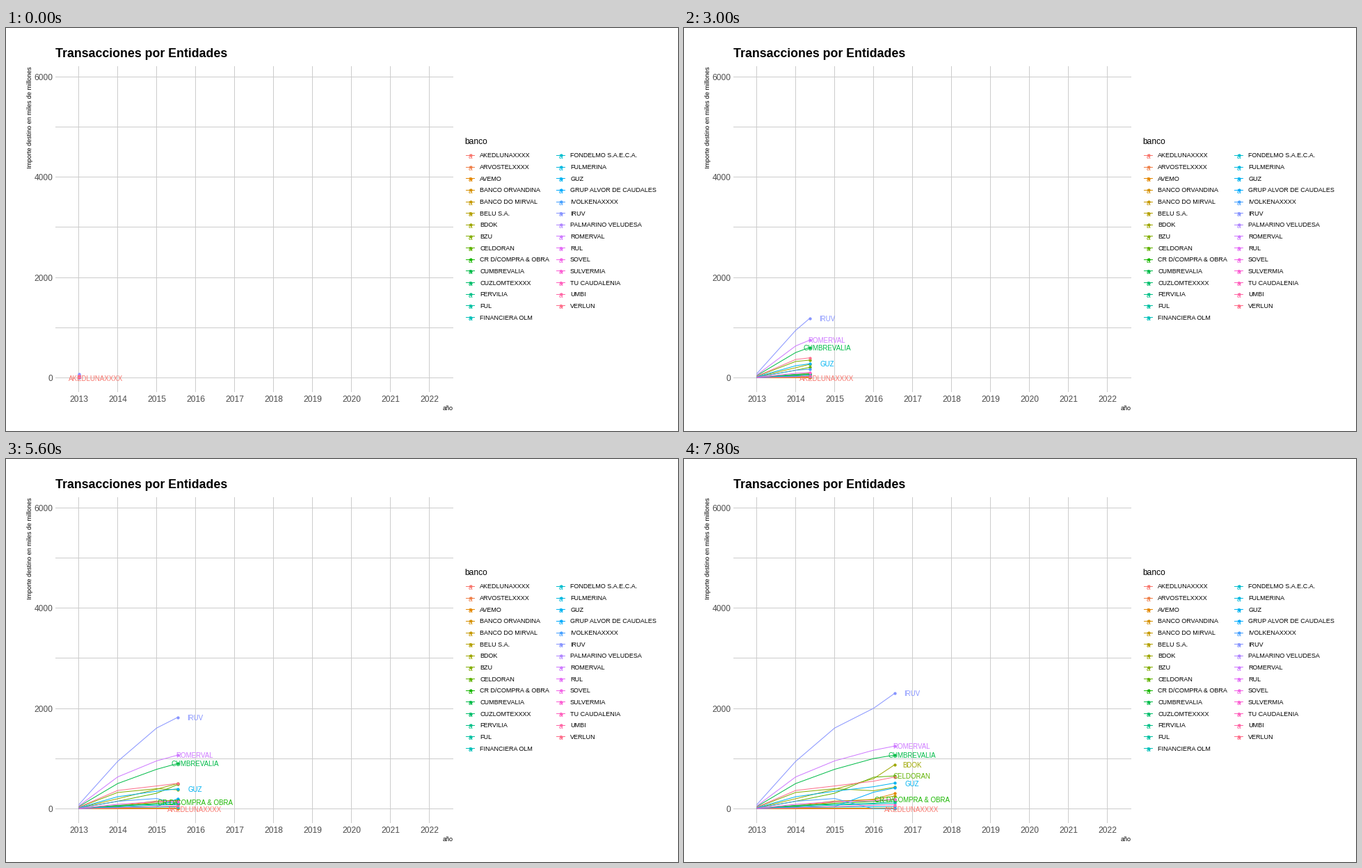
Recreate the animation shown at these times as a matplotlib script. Size 966x580 px, loop 8 s.

```python
import math

import numpy as np
import matplotlib.pyplot as plt
from matplotlib.animation import FuncAnimation

W, H, DPI = 966, 580, 64
FRAMES, INTERVAL, STEPS_PER_YEAR = 40, 200, 11
LABEL_GAP = 9

BANKS = [
    "AKEDLUNAXXXX", "ARVOSTELXXXX", "AVEMO", "BANCO ORVANDINA",
    "BANCO DO MIRVAL", "BELU S.A.", "BDOK", "BZU", "CELDORAN",
    "CR D/COMPRA & OBRA", "CUMBREVALIA", "CUZLOMTEXXXX", "FERVILIA", "FUL",
    "FINANCIERA OLM", "FONDELMO S.A.E.C.A.", "FULMERINA", "GUZ",
    "GRUP ALVOR DE CAUDALES", "IVOLKENAXXXX", "IRUV", "PALMARINO VELUDESA",
    "ROMERVAL", "RUL", "SOVEL", "SULVERMIA", "TU CAUDALENIA", "UMBI",
    "VERLUN",
]

# Yearly amounts for 2014 to 2017; 2013 is a small share of 2014.
AMOUNTS = {
    "AKEDLUNAXXXX": (0, 0, 0, 0),
    "ARVOSTELXXXX": (2, 3, 4, 5),
    "AVEMO": (50, 135, 190, 400),
    "BANCO ORVANDINA": (8, 10, 8, 12),
    "BANCO DO MIRVAL": (12, 15, 10, 14),
    "BELU S.A.": (60, 155, 180, 320),
    "BDOK": (200, 390, 600, 1114),
    "BZU": (325, 400, 360, 490),
    "CELDORAN": (150, 310, 630, 676),
    "CR D/COMPRA & OBRA": (50, 110, 145, 215),
    "CUMBREVALIA": (503, 787, 1002, 1130),
    "FERVILIA": (70, 85, 110, 180),
    "FINANCIERA OLM": (40, 75, 95, 130),
    "FULMERINA": (25, 35, 40, 50),
    "GUZ": (240, 350, 440, 575),
    "GRUP ALVOR DE CAUDALES": (30, 45, 330, 486),
    "IVOLKENAXXXX": (150, 205, 0, 0),
    "IRUV": (945, 1610, 2004, 2554),
    "ROMERVAL": (635, 955, 1168, 1320),
    "SULVERMIA": (90, 140, 160, 215),
    "TU CAUDALENIA": (20, 45, 70, 90),
    "VERLUN": (365, 455, 550, 705),
}

# Earlier names keep their label when two would overlap.
LABEL_ORDER = [
    "AKEDLUNAXXXX", "CUMBREVALIA", "CR D/COMPRA & OBRA", "GUZ", "IRUV",
    "ROMERVAL", "BDOK", "CELDORAN", "IVOLKENAXXXX",
]


def hcl(hue, chroma=100, light=65):
    """Polar CIE-LUV colour as clipped sRGB."""
    a = math.radians(hue)
    u = chroma * math.cos(a) / (13 * light) + 0.1978
    v = chroma * math.sin(a) / (13 * light) + 0.4683
    y = ((light + 16) / 116) ** 3
    xyz = np.array([9 * u / (4 * v), 1, (12 - 3 * u - 20 * v) / (4 * v)]) * y
    lin = np.array([[3.2406, -1.5372, -0.4986],
                    [-0.9689, 1.8758, 0.0415],
                    [0.0557, -0.2040, 1.0570]]) @ xyz
    lin = np.clip(lin, 0, 1)
    return np.where(lin <= 0.0031308, 12.92 * lin,
                    1.055 * lin ** (1 / 2.4) - 0.055)


COLORS = {b: hcl(15 + 360 * i / len(BANKS)) for i, b in enumerate(BANKS)}
SERIES = {b: np.array([0.085 * v[0], *v]) for b, v in AMOUNTS.items()}


def px(n):
    return n * 72 / DPI


def x_at(t):
    return 104.5 + 56 * t


def y_at(v):
    return 503.4 - 0.07217 * v


plt.rcParams["font.family"] = "Liberation Sans"
fig = plt.figure(figsize=(W / DPI, H / DPI), dpi=DPI, facecolor="white")
ax = fig.add_axes([0, 0, 1, 1])
ax.set_xlim(0, W)
ax.set_ylim(H, 0)
ax.axis("off")


def text(x, y, s, size, color="black", **kw):
    return ax.text(x, y, s, fontsize=px(size), color=color, **kw)


def line(xs, ys, color, z=1):
    return ax.plot(xs, ys, color=color, lw=px(1), snap=False,
                   solid_capstyle="butt", zorder=z)[0]


def dot(x, y, color, z=3):
    return ax.plot([x], [y], "o", color=color, ms=px(4.3), mew=0,
                   snap=False, zorder=z)[0]


# Grid and axes
for v in range(0, 6001, 1000):
    y = math.floor(y_at(v)) + 0.5
    line([71, 643], [y, y], "#cccccc")
    if v % 2000 == 0:
        text(67.5, y + 4.5, str(v), 12, "#4d4d4d", ha="right")
for k in range(10):
    x = x_at(k)
    line([x, x], [55, 524], "#cccccc")
    text(x, 538, str(2013 + k), 12, "#4d4d4d", ha="center")

text(71, 42.5, "Transacciones por Entidades", 17.7, weight="bold")
text(37, 55.5, "Importe destino en miles de millones", 9,
     rotation=90, ha="right", va="baseline", rotation_mode="anchor")
text(643, 550, "año", 9, ha="right")

# Legend
text(659, 167, "banco", 12)
for i, bank in enumerate(BANKS):
    col, row = divmod(i, 15)
    x, y = 667.5 + 130 * col, 183.4 + 16.65 * row
    c = COLORS[bank]
    line([x - 6.5, x + 6.5], [math.floor(y) + 0.5] * 2, c)
    dot(x, y, c)
    text(x, y + 4.6, "a", 10, c, ha="center", zorder=4)
    text(x + 13.5, y + 3, bank, 9)

# Moving parts
paths = {b: line([], [], COLORS[b], 2) for b in BANKS if b in SERIES}
dots = {b: dot(0, 0, COLORS[b]) for b in paths}
labels = {b: text(0, 0, b, 9.8, COLORS[b], ha="center", zorder=5)
          for b in LABEL_ORDER}


def update(i):
    t = i / STEPS_PER_YEAR
    years = np.append(np.arange(math.ceil(t)), t)
    head = {}
    for bank, path in paths.items():
        ys = y_at(np.interp(years, range(5), SERIES[bank]))
        path.set_data(x_at(years), ys)
        dots[bank].set_data([x_at(t)], [ys[-1]])
        head[bank] = ys[-1]
    taken = []
    for bank, label in labels.items():
        y = head[bank]
        free = all(abs(y - other) >= LABEL_GAP for other in taken)
        label.set_visible(free)
        if free:
            taken.append(y)
            label.set_position((x_at(t) + 24.5, y + 4.2))
    return [*paths.values(), *dots.values(), *labels.values()]


anim = FuncAnimation(fig, update, frames=FRAMES, interval=INTERVAL,
                     repeat=True, repeat_delay=0, blit=False)
plt.show()
```
